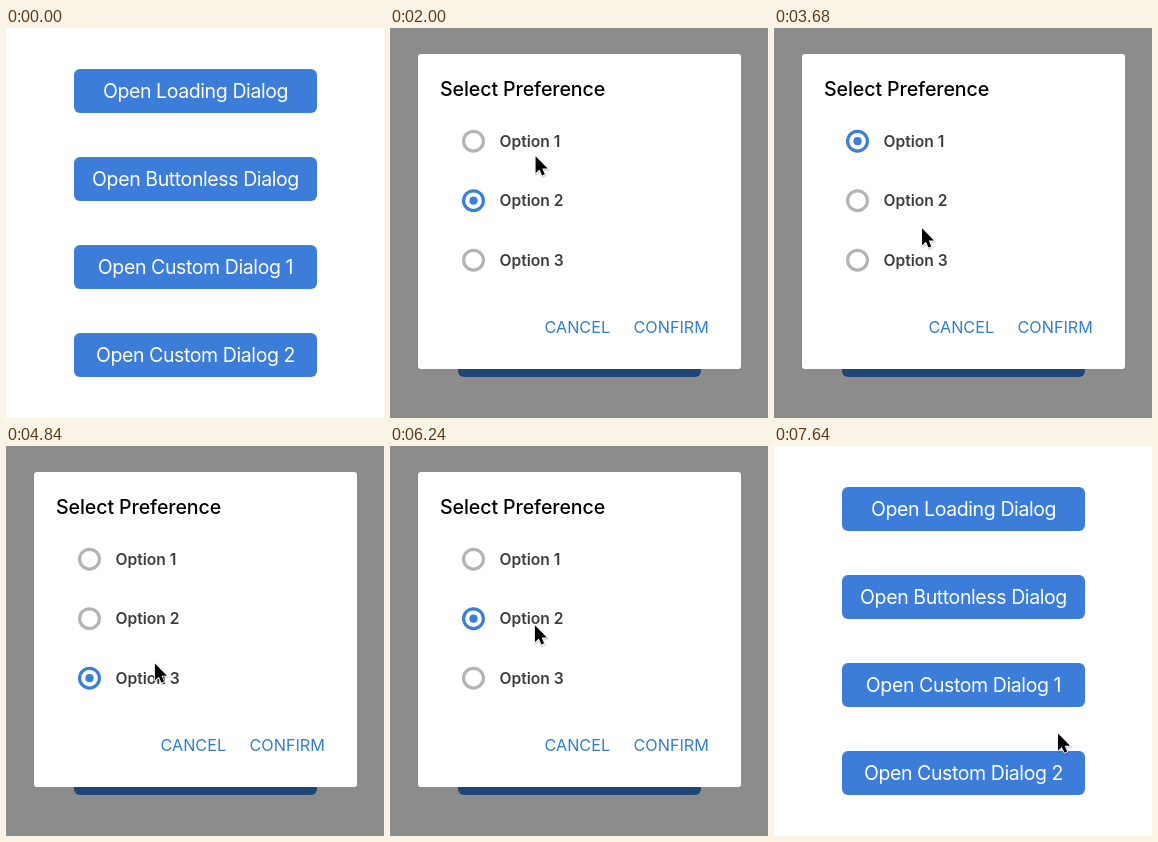
Recreate the animation shown at these times as an HTML page. Size 378 px wide and 390 px high, loop 8040 ms.

```html
<!DOCTYPE html>
<html lang="en">
<head>
<meta charset="utf-8">
<title>Dialog demo</title>
<style>
  html, body { margin: 0; width: 100%; height: 100%; overflow: hidden; background: #fff; }
  svg { display: block; width: 378px; height: 390px; font-family: Inter, Roboto, sans-serif; }
  .button rect { fill: #3b7dd8; }
  .button text { fill: #fff; font-size: 19.5px; letter-spacing: -.4px; text-anchor: middle; }
  .title { font-size: 19.6px; font-weight: 500; letter-spacing: -.1px; }
  .option text { fill: #3d3d40; font-size: 15.6px; font-weight: 600; }
  .option .ring { fill: none; stroke: #b4b4b4; stroke-width: 3.2; }
  .option .dot { fill: none; }
  .option.selected .ring { stroke: #3b80d6; }
  .option.selected .dot { fill: #3b80d6; }
  .action { fill: #2f80d0; font-size: 16.2px; }
</style>
</head>
<body>
<svg viewBox="0 0 378 390">
  <g id="buttons"></g>
  <g id="dialog">
    <rect width="378" height="390" fill-opacity=".45"/>
    <rect x="28" y="26" width="323" height="315" rx="3" fill="#fff"/>
    <text class="title" x="50" y="67.5">Select Preference</text>
    <g id="options"></g>
    <text class="action" x="154.5" y="305">CANCEL</text>
    <text class="action" id="confirm" x="243.5" y="305">CONFIRM</text>
  </g>
  <g id="cursor">
    <path d="M0 0V17L3.9 13.4L6.5 19.3L9.2 18.1L6.7 12.3H12Z" transform="translate(.5 1.2)"
      fill="none" stroke="#000" stroke-opacity=".15" stroke-width="2.5" stroke-linejoin="round"/>
    <path d="M0 0V17L3.9 13.4L6.5 19.3L9.2 18.1L6.7 12.3H12Z"
      stroke="#fff" stroke-width="1.6" stroke-linejoin="round" paint-order="stroke"/>
  </g>
</svg>
<script>
const LOOP = 8040, OPEN = 1200, CLOSE = 7640;
const $ = id => document.getElementById(id);

$('buttons').innerHTML = ['Loading Dialog', 'Buttonless Dialog', 'Custom Dialog 1', 'Custom Dialog 2']
  .map((label, i) => `<g class="button" transform="translate(68 ${41 + 88 * i})">
    <rect width="243" height="44" rx="6"/><text x="121.5" y="29">Open ${label}</text></g>`).join('');

$('options').innerHTML = [1, 2, 3]
  .map(n => `<g class="option" transform="translate(83.5 ${53.7 + 59.5 * n})">
    <circle class="ring" r="9.9"/><circle class="dot" r="4.1"/>
    <text x="26" y="5.6">Option ${n}</text></g>`).join('');

const customButton = $('buttons').children[2];
const options = [...$('options').children];

// Each press dims its element at once; release fades it back.
const presses = [
  { el: customButton, down: 920, up: 1065 },
  { el: options[0], down: 2520, up: 2665 },
  { el: options[2], down: 4120, up: 4265 },
  { el: options[1], down: 5560, up: 5785 },
  { el: $('confirm'), down: 7480, up: 7585 }
];

// Cursor strokes; a larger snap reaches the end sooner.
const moves = [
  { start: 0, end: 800, from: [215, 396], to: [169, 248], snap: 4 },
  { start: 1600, end: 2400, from: [169, 248], to: [143.5, 117.5], snap: 5.5 },
  { start: 3360, end: 4040, from: [143.5, 117.5], to: [149, 218], snap: 4.5 },
  { start: 4820, end: 5400, from: [149, 218], to: [144, 178.5], snap: 4.5 },
  { start: 6220, end: 7120, from: [144, 178.5], to: [284, 287.5], snap: 4.5 }
];

const clamp = u => Math.min(1, Math.max(0, u));
const easeInOut = u => u < .5 ? 2 * u * u : 1 - 2 * (1 - u) ** 2;
const glide = (u, snap) => 1 - (1 - u) ** snap * (1 + snap * u);

function pressOpacity(t, { down, up }) {
  return t < down ? 1 : .2 + .8 * easeInOut(clamp((t - up) / 290));
}

function cursorAt(t) {
  const { start, end, from, to, snap } = moves.findLast(m => t >= m.start);
  const k = glide(clamp((t - start) / (end - start)), snap);
  return from.map((v, i) => v + (to[i] - v) * k);
}

function selectedAt(t) {
  return t < 2680 ? 1 : t < 4280 ? 0 : t < 5800 ? 2 : 1;
}

function draw() {
  const t = performance.now() % LOOP;
  $('dialog').style.display = t >= OPEN && t < CLOSE ? '' : 'none';
  presses.forEach(p => p.el.setAttribute('opacity', pressOpacity(t, p)));
  options.forEach((o, i) => o.classList.toggle('selected', i === selectedAt(t)));
  $('cursor').style.display = t >= 40 ? '' : 'none';
  $('cursor').setAttribute('transform', `translate(${cursorAt(t)})`);
  requestAnimationFrame(draw);
}
draw();
</script>
</body>
</html>
```
